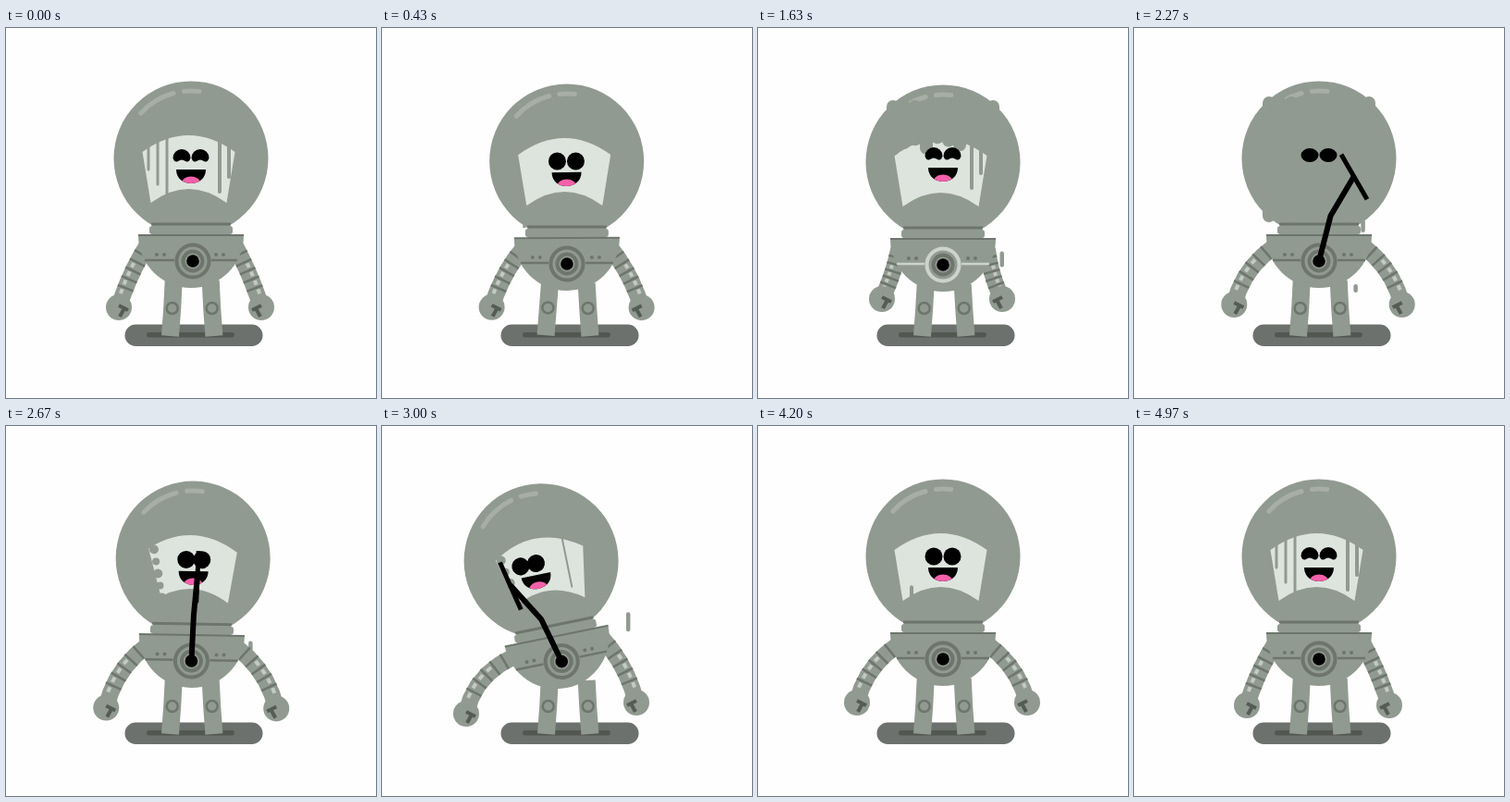
Recreate the animation shown at these times as an HTML page with a canvas. Size 400x400 px, loop 5.01 s.

```html
<!DOCTYPE html>
<html>
<head>
<meta charset="utf-8">
<style>
html, body { margin: 0; width: 100%; height: 100%; overflow: hidden; background: #fefefe; }
canvas { display: block; }
</style>
</head>
<body>
<canvas id="stage" width="400" height="400"></canvas>
<script>
const c = document.getElementById('stage').getContext('2d');
const LOOP = 5010, TAU = Math.PI * 2, RAD = Math.PI / 180;
const GREY = '#919a91', DARK = '#6d756d', LIGHT = '#dde4de', SHINE = '#a6aea6';

const clamp = v => Math.max(0, Math.min(1, v));
const mix = (a, b, k) => a + (b - a) * k;
const smooth = k => k * k * (3 - 2 * k);
const ramp = (t, a, b) => smooth(clamp((t - a) / (b - a)));
const pulse = (t, a, b, d, e) => ramp(t, a, b) - ramp(t, d, e);
const random = seed => { const v = Math.sin(seed * 127.1 + 3) * 43758.5; return v - Math.floor(v); };

// Marching, crouching and wiping are blended by their own envelopes.
function poseAt(t) {
  const march = pulse(t, 0, 280, 1050, 1350);
  const swing = march * Math.cos((t - 870) / 290 * Math.PI);
  const crouch = pulse(t, 1370, 1600, 1950, 2150);
  const wipe = pulse(t, 2270, 2400, 3670, 3900);
  const sway = -Math.cos((t - 3000) / 446 * TAU);
  const lean = wipe * sway;
  const spread = 15 * pulse(t, 2000, 2330, 4300, 4700) + 4 * march - 12 * crouch;
  const hand = side => [
    199 + side * (77 + spread) + 14 * swing + 16 * lean,
    302 - 9 * crouch + 6 * wipe - 3 * pulse(t, 2000, 2270, 4300, 4700) + side * (4 * swing + 6 * lean)
  ];
  return {
    hand, swing, crouch,
    angle: (11.5 * lean - 3.2 * swing) * RAD,
    drop: 3 * march + 4 * crouch + 2 * wipe - 2 * pulse(t, 1150, 1350, 1360, 1500),
    face: 14.5 * lean - 5 * swing,
    squeeze: wipe,
    blade: mix(38, 2 + 40 * sway, ramp(t, 2270, 2400))
  };
}

function line(points, width, color, cap = 'butt') {
  c.beginPath();
  points.forEach(p => c.lineTo(...p));
  c.lineWidth = width;
  c.strokeStyle = color;
  c.lineCap = cap;
  c.lineJoin = 'round';
  c.stroke();
}
function disc(x, y, r, color, ry = r) {
  c.beginPath();
  c.ellipse(x, y, r, ry, 0, 0, TAU);
  c.fillStyle = color;
  c.fill();
}
function ring(x, y, r, width, color) {
  c.beginPath();
  c.arc(x, y, r, 0, TAU);
  c.lineWidth = width;
  c.strokeStyle = color;
  c.stroke();
}
function box(x, y, w, h, r, color) {
  c.beginPath();
  c.roundRect(x, y, w, h, r);
  c.fillStyle = color;
  c.fill();
}

function leg(side, swing, drop) {
  const k = clamp(-side * swing);
  const joint = (rest, lifted, y) => [201.2 + side * mix(rest, lifted, k), y];
  const knee = joint(21.5, 29, mix(303, 290, k));
  line([joint(20, 14, 273 + drop), knee, joint(23.7, 34, mix(333, 318, k))], 19, GREY);
  ring(...knee, 6, 2.5, DARK);
}

function arm(side, shoulder, hand) {
  const [dx, dy] = [hand[0] - shoulder[0], hand[1] - shoulder[1]];
  const bow = (side * dx - 23) * .6;
  const bend = [shoulder[0] + dx / 2 + side * bow, shoulder[1] + dy / 2 - bow * .6];
  const at = k => [0, 1].map(i => (1 - k) ** 2 * shoulder[i] + 2 * k * (1 - k) * bend[i] + k * k * hand[i]);
  const across = (k, off) => {
    const [x, y] = at(k), [x1, y1] = at(k + .02), d = Math.hypot(x1 - x, y1 - y);
    return [x - (y1 - y) / d * off, y + (x1 - x) / d * off];
  };
  line([0, .2, .4, .6, .8, 1].map(at), 18, GREY, 'round');
  for (let k = .14; k < .75; k += .14) {
    line([across(k, -9), across(k, 9)], 2.5, DARK);
    if (k > .2) line([across(k + .03, side * -3), across(k + .1, side * -3)], 4, '#c3cac3');
  }
  disc(...hand, 14, GREY);
  const mark = (x, y) => [hand[0] - side * x, hand[1] + y];
  line([mark(0, -2), mark(10, 3)], 4, '#555c55');
  line([mark(6, 1), mark(1, 10)], 4, '#555c55');
}

function torso(t) {
  c.beginPath();
  c.arc(0, -57, 57, 0, Math.PI);
  c.fillStyle = GREY;
  c.fill();
  const trim = t > 1540 && t < 1765 ? '#ccd3cc' : DARK;
  const x = 2 * (1 - ramp(t, 0, 100));
  line([[-50, -30], [50, -30]], 2.5, trim);
  for (const d of [-37, -29, 27, 35]) disc(d, -36, 2, DARK);
  disc(x, -29, 20, GREY);
  ring(x, -29, 17.5, 4, trim);
  ring(x, -29, 10.5, 4, DARK);
  disc(x, -29, 6.8, '#000');
  box(-42, -73, 84, 17, 0, GREY);
  line([[-43, -69], [43, -69]], 3, DARK);
  box(-45, -67, 90, 9, 3, GREY);
  line([[-57, -57], [57, -57]], 2, DARK);
}

function visor() {
  c.beginPath();
  c.moveTo(-52.5, -7);
  c.quadraticCurveTo(-2.5, -43, 47.5, -7);
  c.lineTo(38.5, 48);
  c.quadraticCurveTo(-2.5, 18, -43.5, 48);
  c.fillStyle = LIGHT;
  c.fill();
}

function eyes(t, x, y, squeeze) {
  const happy = t < 200 || t > 4300 || (t > 1450 && t < 1950);
  const squashed = t >= 1950 && t < 2400;
  y += squashed ? -3.5 : happy ? -2 : 1.5 * squeeze;
  for (const s of [-1, 1]) {
    const ex = x + s * (10 - 1.5 * squeeze);
    if (!happy) { disc(ex, y, 9.5, '#000', squashed ? 7.5 : 9.5); continue; }
    c.beginPath();
    c.arc(ex, y + 1.5, 9.5, Math.PI, 0);
    c.quadraticCurveTo(ex + 8, y + 7, ex + 4, y + 5);
    c.quadraticCurveTo(ex, y + 2, ex - 4, y + 5);
    c.quadraticCurveTo(ex - 8, y + 7, ex - 9.5, y + 1.5);
    c.fillStyle = '#000';
    c.fill();
  }
}

function mouth(x, y, turn) {
  c.save();
  c.translate(x, y + 12);
  c.rotate(turn);
  c.beginPath();
  c.moveTo(-16, 0);
  c.lineTo(16, 0);
  c.bezierCurveTo(16, 20, -16, 20, -16, 0);
  c.fillStyle = '#000';
  c.fill();
  c.clip();
  disc(0, 15, 10.5, '#f460a9', 7.5);
  c.restore();
}

// A streak grows down the visor, then slides off it.
function streak(t, x, width, length, from, to) {
  if (t < from || t > to + 300) return;
  const slide = 85 * ramp(t, to, to + 300) - 30;
  line([[x, slide], [x, slide + length * ramp(t, from, from + 350)]], width, GREY, 'round');
}

function goo(t, blade) {
  if (t > 1100 && t < 2400) {
    const cover = .15 * ramp(t, 1100, 1600) + .85 * ramp(t, 1640, 2080);
    for (let i = 0; i < 10; i++) {
      const y = -38 + cover * (125 - i * 5) + 7 * Math.sin(i * 2.3 + 1) * Math.min(1, cover * 6);
      line([[i * 12 - 54, -60], [i * 12 - 54, Math.min(y, 62)]], 14, GREY, 'round');
    }
  } else if (t >= 2400 && t < 3600) {
    const edge = t < 2554 ? blade : mix(-40, -60, ramp(t, 3250, 3600));
    const slant = edge * .24;
    c.beginPath();
    [[-60, -50], [edge + slant * 2, -50], [edge - slant, 55], [-60, 55]].forEach(p => c.lineTo(...p));
    c.fillStyle = GREY;
    c.fill();
    for (let i = 0; i < 6; i++) disc(edge + slant * (.5 - i * .25), -22 + i * 13, 4 + i % 2, GREY);
  }
  for (let i = 0; i < 5; i++) {
    const x = (i % 2 ? 1 : -1) * (46 - 5 * i), length = 42 + 8 * i;
    streak(t < 600 ? t + LOOP : t, x, 3 + i % 2, length, 4350 + 30 * i, 5200);
    if (i % 2) streak(t, x, 3 + i % 2, length - 8, 1250, 2100);
  }
  for (let i = 0; i < 2; i++) streak(t, 27 - 61 * i, 2 + 2 * i, 64, 2600 + 700 * i, 3300 + 700 * i);
}

function head(t, pose) {
  const { face, crouch, squeeze, swing, blade } = pose;
  c.save();
  c.beginPath();
  c.rect(-100, -240, 200, 172);
  c.clip();
  c.translate(0, -140);
  disc(0, 0, 83.5, GREY);
  c.lineCap = 'round';
  c.lineWidth = 5;
  c.strokeStyle = SHINE;
  for (const [a, b] of [[222, 255], [264, 277]]) {
    c.beginPath();
    c.arc(0, 0, 73, a * RAD, b * RAD);
    c.stroke();
  }
  visor();
  const lift = -6 * crouch;
  mouth(face * .6, lift + 2 * squeeze, -9 * swing * RAD);
  goo(t, blade);
  eyes(t, face, lift, squeeze);
  c.restore();
}

function wiper(t, x) {
  const out = pulse(t, 2110, 2250, 3690, 3880);
  if (!out) return;
  const a = mix(60, 90 + x * .33, ramp(t, 2270, 2400)) * RAD;
  const from = (px, py) => [px * out, -29 + (py + 29) * out];
  const tip = s => from(x + s * Math.cos(a) * 28, -120 + s * Math.sin(a) * 28);
  line([[0, -29], from(x * .33, -78), from(x, -121)], 6, '#000');
  line([tip(-1), tip(1)], 5, '#000');
}

function drops(t) {
  for (let i = 0; i < 14; i++) {
    const age = t - 870 - i * 220;
    if (Math.abs(age) > 200) continue;
    const x = 200 + (random(i) < .35 ? -1 : 1) * mix(36, 68, random(i + 20));
    const y = mix(190, 295, random(i + 40)) + age * .12;
    const length = 24 * random(i + 60) * (1 - Math.abs(age) / 400);
    line([[x, y], [x, y + length + .1]], 4.5, GREY, 'round');
  }
}

function draw(t) {
  const pose = poseAt(t), { angle, drop, swing, hand } = pose;
  const cos = Math.cos(angle), sin = Math.sin(angle);
  c.fillStyle = '#fefefe';
  c.fillRect(0, 0, 400, 400);
  box(128.5, 320.5, 149, 23.5, 11.7, '#6d716d');
  box(152, 329, 95, 5.5, 2.7, '#525752');
  drops(t);
  for (const side of [-1, 1]) {
    leg(side, swing, drop);
    const x = side * 48, y = -45;
    arm(side, [200 + x * cos - y * sin, 281 + drop + x * sin + y * cos], hand(side));
  }
  c.save();
  c.translate(200, 281 + drop);
  c.rotate(angle);
  head(t, pose);
  torso(t);
  wiper(t, pose.blade);
  c.restore();
}

const start = performance.now();
function tick() {
  draw((performance.now() - start) % LOOP);
  requestAnimationFrame(tick);
}
tick();
</script>
</body>
</html>
```
